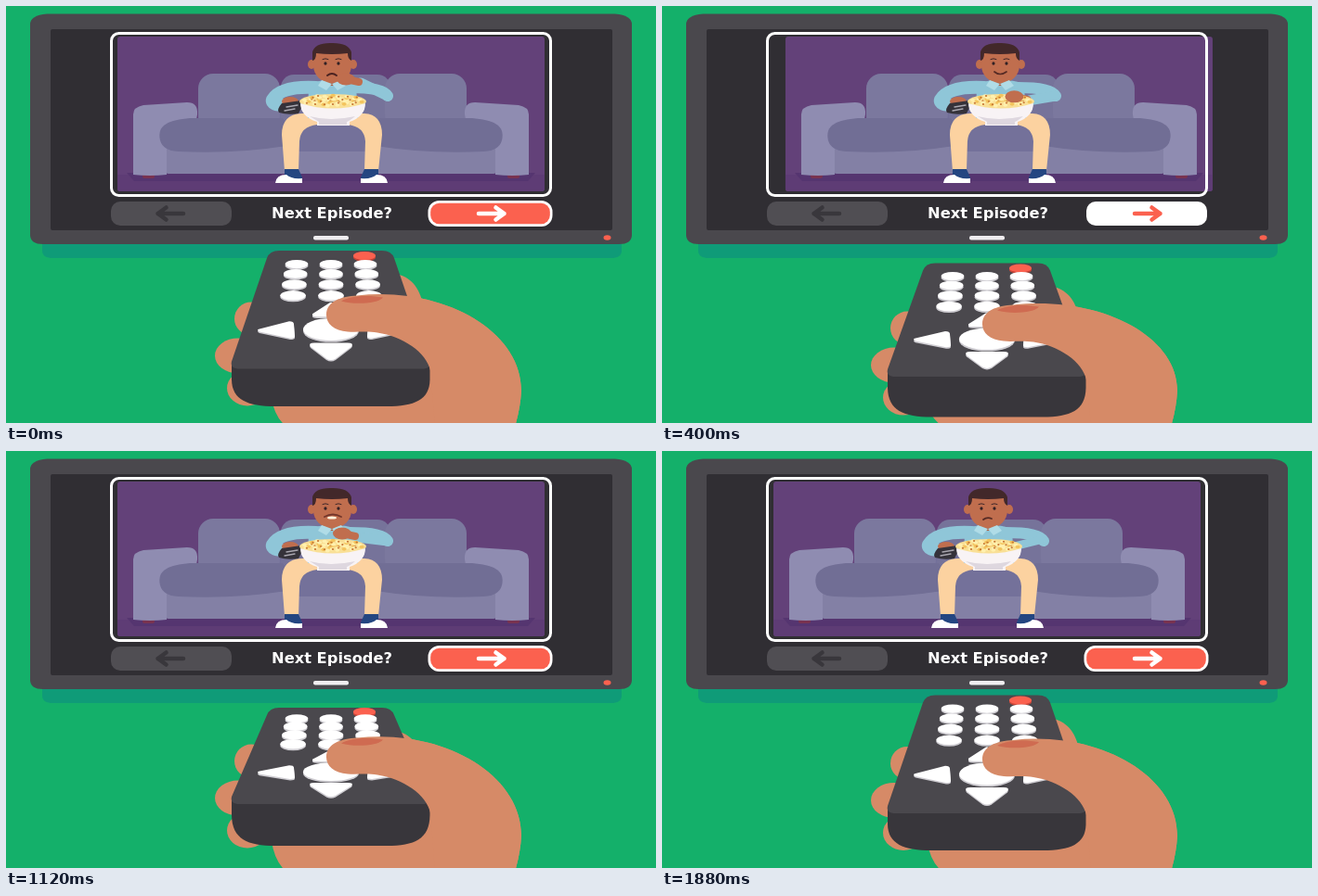
Write an HTML page with a canvas that moves like this. It is 700 by 450 pixels and loops after 1.92 s.

```html
<!DOCTYPE html>
<html lang="en">
<head>
<meta charset="utf-8">
<title>Next Episode</title>
<style>
  html, body { margin: 0; width: 100%; height: 100%; overflow: hidden; background: #14b06a; }
  canvas { position: absolute; left: 0; top: 0; }
  #label {
    position: absolute; left: 251px; top: 213px; width: 200px;
    text-align: center; color: #fff; white-space: nowrap;
    font: 700 16.3px/22px "DejaVu Sans", sans-serif;
  }
</style>
</head>
<body>
<canvas id="stage" width="700" height="450"></canvas>
<div id="label">Next Episode?</div>
<script>
const c = document.getElementById('stage').getContext('2d');
const LOOP = 1920, STEP = 40, PANEL_GAP = 700;
const SKIN = '#d68a67', DARK = '#302e33', BODY = '#4a484d', RED = '#fb614f';
const FACE = '#c06e4e', SHIRT = '#8fc6d8', HAIR = '#42282a', PANTS = '#fcd2a0';

function shape(d, fill) {
  c.fillStyle = fill;
  c.fill(new Path2D(d));
}
function line(d, color, width) {
  c.strokeStyle = color;
  c.lineWidth = width;
  c.lineCap = c.lineJoin = 'round';
  c.stroke(new Path2D(d));
}
function box(x, y, w, h, r, fill) {
  c.beginPath();
  c.roundRect(x, y, w, h, r);
  c.fillStyle = fill;
  c.fill();
}
function oval(x, y, rx, ry, fill) {
  c.beginPath();
  c.ellipse(x, y, rx, ry, 0, 0, Math.PI * 2);
  c.fillStyle = fill;
  c.fill();
}
// Draws once as is and once mirrored about x = 350.
function twice(draw) {
  draw();
  c.save();
  c.translate(700, 0);
  c.scale(-1, 1);
  draw();
  c.restore();
}

// Remote edges over the loop: far end, front edge of the face, bottom.
const KNOTS = [0, 280, 600, 880, 1120, 1440, 1660, 1880];
const FAR = [264, 273, 284, 283, 277, 266, 262.5, 263.5];
const FRONT = [390.5, 398, 398, 387.5, 380, 379, 383, 390];
const BOTTOM = [432, 441, 445, 435, 426, 422, 425, 431];

// Smooth periodic curve through the knots.
function curve(values, t) {
  const n = KNOTS.length;
  const time = i => KNOTS[(i + n) % n] + Math.floor(i / n) * LOOP;
  const val = i => values[(i + n) % n];
  const slope = i => (val(i + 1) - val(i - 1)) / (time(i + 1) - time(i - 1));
  let i = n - 1;
  while (KNOTS[i] > t) i--;
  const h = time(i + 1) - time(i), u = (t - time(i)) / h;
  const u2 = u * u, u3 = u2 * u;
  return val(i) * (2 * u3 - 3 * u2 + 1) + val(i + 1) * (3 * u2 - 2 * u3)
    + h * (slope(i) * (u3 - 2 * u2 + u) + slope(i + 1) * (u3 - u2));
}

// Eating hand: time, x, y.
const REACH = [
  [0, 366, 79], [160, 370, 99], [320, 370, 100], [600, 352, 89], [700, 352, 80],
  [880, 372, 111], [1000, 370, 107], [1120, 362, 89], [1240, 354, 80],
  [1440, 361, 100], [1560, 361, 99], [1700, 356, 80], [1880, 372, 111], [LOOP, 372, 111]
];
function reach(t) {
  let i = 0;
  while (REACH[i + 1][0] <= t) i++;
  const [t0, x0, y0] = REACH[i], [t1, x1, y1] = REACH[i + 1];
  const u = (t - t0) / (t1 - t0), e = u * u * (3 - 2 * u);
  return [x0 + (x1 - x0) * e, y0 + (y1 - y0) * e];
}

function slide(t) {
  const u = Math.min(1, Math.max(0, (t - 60) / 408));
  return u < .5 ? 4 * u ** 3 : 1 - 4 * (1 - u) ** 3;
}

function sofa() {
  shape('M130 180H570L562 189H138Z', '#553570');
  box(207, 108, 289, 60, 4, '#73709a');
  box(296, 74, 118, 62, 14, '#76739a');
  for (const x of [207, 408]) box(x, 73, 88, 60, 16, '#7b789e');
  box(172, 140, 356, 41, 3, '#8380a5');
  twice(() => {
    box(147, 179, 13, 7, 2, '#793350');
    shape('M137 182V117Q137 109 148 107L195 104Q207 104 206 117L204 128Q175 128 173 140V182Q155 184 137 182Z', '#8f8cb1');
    shape('M166 145C162 128 176 123 198 121H298Q307 132 302 151Q245 160 185 157Q169 156 166 145Z', '#716e95');
  });
  box(300, 122, 104, 35, 10, '#74719a');
}

function mouth(t) {
  if (t < 40) line('M346 75Q351 71 356 75', '#4a2220', 2);
  else if (t < 480) line('M345 71Q351 76 358 71', '#552a24', 1.7);
  else if (t < 760) {
    oval(352, 69, 10, 5, '#a93635');
    oval(352, 70, 6, 2.5, '#611d28');
  } else if (t >= 1000 && t < 1640) {
    line('M343 71Q352 66 361 71', '#73362b', 1.8);
    oval(351, 72, 5, 1.6, '#fff2dc');
  } else line('M346 74Q350 71 355 73', '#552a24', 1.8);
}

function head(t) {
  oval(329, 63, 4, 5, FACE);
  oval(374, 63, 4, 5, FACE);
  box(344, 74, 15, 12, 4, '#ad6044');
  box(331, 46, 41, 37, [10, 10, 19, 19], FACE);
  shape('M330 59V50Q332 40 349 40Q369 39 372 50V59Q368 57 368 51Q351 53 334 51Q334 58 330 59Z', HAIR);
  for (const x of [344, 358]) {
    oval(x, 62, 1.6, 1.8, '#302024');
    line(`M${x - 3} 57.5Q${x} 56 ${x + 3} 57.5`, HAIR, 1);
  }
  mouth(t);
}

function legs() {
  shape('M318 116Q297 117 297 139L300 178H315L316 146Q317 130 335 128H368Q386 130 387 146L386 178H401L405 139Q405 117 386 116Z', PANTS);
  for (const [x, s] of [[308, 1], [393, -1]]) {
    c.save();
    c.translate(x, 0);
    c.scale(s, 1);
    shape('M-8 176H7L11 185V190H-8Z', '#244681');
    shape('M-18 191Q-17 182 -6 182Q-1 187 11 186V191Z', '#fff');
    c.restore();
  }
}

function bowl([hx, hy], t) {
  oval(352, 103, 36, 8, '#f9df95');
  for (let i = 0; i < 44; i++) {
    const a = i * 2.4, r = Math.sqrt(i / 44);
    const x = 352 + Math.cos(a) * r * 33, y = 102 + Math.sin(a) * r * 6;
    oval(x, y, 2.5, 1.8, i % 3 ? '#fff0ae' : '#f3c45e');
    if (i % 2) oval(x + 1, y, 1.2, 1, '#c87835');
  }
  if (hy < 106) {
    oval(hx, hy, 10, 6.5, FACE);
    if (t > 480 && t < 700) oval(hx - 2, hy - 4, 4, 2.5, '#fff0b7');
  }
  shape('M317 105Q352 116 387 105Q387 119 370 125V129H335V125Q317 119 317 105Z', '#f8f3f5');
  shape('M327 119Q349 125 376 119Q370 124 367 125V128H337V125Z', '#ded7df');
}

function man(t) {
  const hand = reach(t);
  legs();
  shape('M326 86Q335 79 351 81Q369 79 377 85L379 121H325Z', SHIRT);
  line('M334 88Q296 86 287 101Q285 107 301 107', SHIRT, 14);
  line('M370 88Q407 88 411 97', SHIRT, 12);
  if (hand[1] < 106) {
    line(`M411 97L${hand[0] + 16} ${hand[1] + 4}`, SHIRT, 11);
    line(`M${hand[0] + 14} ${hand[1] + 3}L${hand[0]} ${hand[1]}`, FACE, 8);
  } else line('M407 96L383 102', SHIRT, 9);
  head(t);
  shape('M340 80L351 84L345 91L336 86ZM361 80L351 84L357 91L366 86Z', '#b0dce7');
  oval(306, 103, 9, 5, FACE);
  shape('M297 105L318 102Q321 103 320 106L315 116Q304 118 294 115Q291 112 297 105Z', '#35323a');
  line('M302 109L314 107M300 113L311 111', '#aaa7b0', 1.3);
  bowl(hand, t);
}

function panel(x, t) {
  c.save();
  c.translate(x, 0);
  box(120, 33, 460, 167, 3, '#634179');
  box(120, 182, 460, 18, [0, 0, 3, 3], '#5e3c75');
  sofa();
  man(t);
  c.restore();
}

function arrow(x, dir, color) {
  const tip = x + dir * 14.5;
  line(`M${x - dir * 13} 224H${tip}M${tip - dir * 9} 217.5L${tip} 224L${tip - dir * 9} 230.5`, color, 4.5);
}

function television(t) {
  shape('M39 240H663V264Q663 272 651 272H51Q39 272 39 264Z', '#0f9b78');
  shape('M26 20Q26 10 44 8.5H656Q674 10 674 20V247Q674 257 660 257H40Q26 257 26 247Z', BODY);
  box(48, 25, 605, 217, 2, DARK);

  c.save();
  c.beginPath();
  c.rect(48, 25, 605, 217);
  c.clip();
  const p = slide(t);
  if (p < 1) panel(-PANEL_GAP * p, t);
  if (p > 0) panel(PANEL_GAP * (1 - p), t);
  c.restore();

  c.beginPath();
  c.roundRect(113.5, 29.5, 473, 175, 8);
  c.strokeStyle = '#fff';
  c.lineWidth = 3;
  c.stroke();

  box(113, 211, 130, 26, 10, '#504e53');
  arrow(178, -1, '#39373c');
  const pressed = t >= 60 && t < 440;
  if (pressed) box(457, 211, 130, 26, 10, '#fff');
  else {
    box(454.5, 210, 134, 28, 12, '#fff');
    box(457.2, 212.7, 128.6, 22.6, 9.5, RED);
  }
  arrow(522, 1, pressed ? RED : '#fff');
  box(331, 248, 38, 4.5, 2, '#f0eef0');
  oval(647.5, 250, 4, 2.8, RED);
}

function key(x, y, rx, ry, fill, shade) {
  oval(x, y + 1.4, rx, ry, shade);
  oval(x, y - .4, rx, ry, fill);
}

function remote(far, front, bottom) {
  const h = front - far, at = k => far + h * k;
  shape(`M243 ${front - 4}H456.5V${front + 13}C456 ${bottom - 7} 440 ${bottom} 410 ${bottom}H290C260 ${bottom} 243.5 ${bottom - 7} 243 ${front + 13}Z`, '#38363b');
  shape(`M281 ${far + 8}Q284 ${far} 294 ${far}H405Q415 ${far} 418 ${far + 8}L456 ${front - 7}Q458 ${front + 1} 448 ${front + 1}H252Q241 ${front + 1} 243 ${front - 7}Z`, BODY);
  key(386, at(.047), 12, 4.5, RED, '#c64438');
  [.118, .2, .29, .385].forEach((k, i) => {
    for (const s of [-1, 0, 1])
      key(350 + s * (37 + i * 1.3), at(k), 12.3 + i * .5, 4.6 + i * .2, '#fff', '#cfcdd2');
  });
  const y = at(.675), v = h / 126;
  const pads = [
    `M273 ${y - 1}L305 ${y - 9 * v}Q310 ${y - 9 * v} 310 ${y - 6 * v}L311 ${y + 7 * v}Q311 ${y + 9 * v} 306 ${y + 9 * v}L273 ${y + 2}Q269 ${y} 273 ${y - 1}Z`,
    `M427 ${y - 1}L395 ${y - 9 * v}Q390 ${y - 9 * v} 390 ${y - 6 * v}L389 ${y + 7 * v}Q389 ${y + 9 * v} 394 ${y + 9 * v}L427 ${y + 2}Q431 ${y} 427 ${y - 1}Z`,
    `M347 ${y - 28 * v}Q350 ${y - 31 * v} 353 ${y - 28 * v}L370 ${y - 17 * v}Q371 ${y - 14 * v} 365 ${y - 14 * v}H335Q329 ${y - 14 * v} 330 ${y - 17 * v}Z`,
    `M332 ${y + 14 * v}H368Q375 ${y + 14 * v} 372 ${y + 18 * v}L355 ${y + 31 * v}Q350 ${y + 34 * v} 345 ${y + 31 * v}L328 ${y + 18 * v}Q325 ${y + 14 * v} 332 ${y + 14 * v}Z`
  ];
  for (const d of pads) {
    c.save();
    c.translate(0, 1.6);
    shape(d, '#cfcdd2');
    c.restore();
    shape(d, '#fff');
  }
  key(350, y, 30, 12 * v, '#fff', '#cfcdd2');
}

// Outer edge of the hand, following the thumb by d while the wrist stays put.
const knuckles = d => `C470 ${303 + d} 555 ${350 + d * .5} 555 415Q554 434 548 454`;

function palm(d, far) {
  oval(264, 338 + d, 18, 18, SKIN);
  oval(250, 378 + d, 25, 19, SKIN);
  oval(260, 413 + d, 22, 19, SKIN);
  shape(`M415 ${far + 25}C433 ${far + 25} 444 ${far + 38} 448 ${far + 54}L420 ${far + 80}Z`, SKIN);
  shape(`M378 ${313 + d}${knuckles(d)}H302Q289 443 286 ${424 + d}H400Z`, SKIN);
}

function thumb(d) {
  shape(`M345 ${334 + d}C345 ${319 + d} 361 ${314 + d} 378 ${313 + d}${knuckles(d)}H462L457 ${394 + d}C453 ${374 + d} 427 ${357 + d} 400 ${353 + d}C388 ${351 + d} 378 ${353 + d} 368 ${352 + d}C353 ${351 + d} 345 ${343 + d} 345 ${334 + d}Z`, SKIN);
  shape(`M361 ${319 + d}C372 ${312 + d} 394 ${313 + d} 406 ${315 + d}C401 ${322 + d} 374 ${323 + d} 361 ${319 + d}Z`, '#cf6b51');
}

function draw(t) {
  c.fillStyle = '#14b06a';
  c.fillRect(0, 0, 700, 450);
  television(t);
  const far = curve(FAR, t), front = curve(FRONT, t);
  const d = far + (front - far) * .675 - 350;
  palm(d, far);
  remote(far, front, curve(BOTTOM, t));
  thumb(d);
}

const start = performance.now();
function tick() {
  const t = (performance.now() - start) % LOOP;
  draw(Math.floor(t / STEP) * STEP);
  requestAnimationFrame(tick);
}
tick();
</script>
</body>
</html>
```
